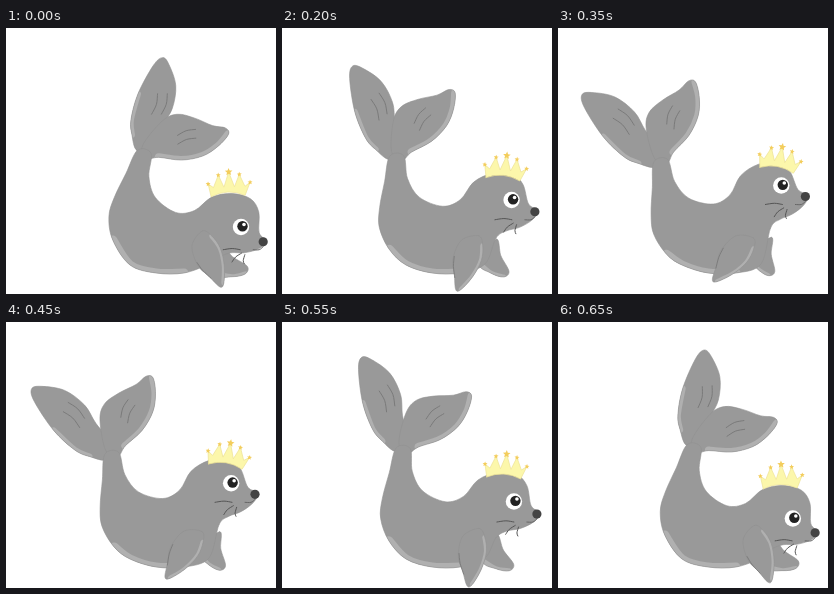
These frames come from a looping animation (270 px wide and 266 px high, 0.7 s). An HTML page with a canvas:

```html
<!DOCTYPE html>
<html lang="en">
<head>
<meta charset="utf-8">
<title>Seal</title>
<style>
html, body { margin: 0; width: 100%; height: 100%; overflow: hidden; background: #fff; }
canvas { display: block; }
</style>
</head>
<body>
<canvas id="stage" width="270" height="266"></canvas>
<script>
const ctx = document.getElementById('stage').getContext('2d');
const LOOP = 700, STEP = 50, RAD = Math.PI / 180;
const GREY = '#999', LIGHT = '#b0b0b0', EDGE = '#919191', LINE = '#777', DARK = '#444';
const PIVOT = [142, 215];

const parse = text => text.split(' ').map(p => p.split(',').map(Number));

// Half-way pose: chest, head, back, tail joint and side rock together, the belly rests
const trunk = parse('214,213 225,206 238,203 251,196 257,187 248,180 243,160 232,149 213,148 194,156 180,173 162,179 139,169 128,150 125,127 111,127 105,152 99,178 98,198 107,220');
const belly = parse('124,237 150,245 178,245 203,236');

// Limbs in units of their length: x from joint to tip, y across
const leftFluke = parse('0,-.08 .15,-.16 .3,-.2 .58,-.18 .9,-.08 1,0 .94,.08 .74,.19 .5,.2 .3,.13 .05,.07');
const rightFluke = parse('0,.08 .15,.1 .4,.19 .65,.2 .85,.13 1,.02 .98,-.06 .84,-.12 .66,-.25 .47,-.34 .28,-.3 0,-.08');
const nearFlipper = parse('0,-.12 .15,-.23 .4,-.27 .7,-.2 .97,-.06 1,.03 .75,.12 .5,.21 .15,.15');
const farFlipper = parse('-.02,-.36 .45,-.18 .96,-.1 1,.13 .69,.36 .25,.47');

// Rises to 1 at the peak time and falls back by the end of the loop
function swing(t, peak) {
  const p = t < peak ? (t / peak) ** .8 : (LOOP - t) / (LOOP - peak);
  return (1 - Math.cos(Math.PI * p)) / 2;
}

const mix = (a, b, k) => a + (b - a) * k;

function rotate([x, y], angle, [ox, oy]) {
  const c = Math.cos(angle), s = Math.sin(angle);
  return [ox + x * c - y * s, oy + x * s + y * c];
}

function smooth(pts, closed) {
  const n = pts.length, path = new Path2D();
  const at = i => closed ? pts[(i + n) % n] : pts[Math.max(0, Math.min(n - 1, i))];
  path.moveTo(...pts[0]);
  for (let i = 0; i < n - (closed ? 0 : 1); i++) {
    const [a, b, c, d] = [at(i - 1), at(i), at(i + 1), at(i + 2)];
    path.bezierCurveTo(b[0] + (c[0] - a[0]) / 6, b[1] + (c[1] - a[1]) / 6,
      c[0] - (d[0] - b[0]) / 6, c[1] - (d[1] - b[1]) / 6, ...c);
  }
  return path;
}

function stroke(path, color, width) {
  ctx.strokeStyle = color;
  ctx.lineWidth = width;
  ctx.stroke(path);
}

// Grey part with a light band along some of its edge
function part(pts, from, to, band) {
  const path = smooth(pts, true);
  ctx.fillStyle = GREY;
  ctx.fill(path);
  ctx.save();
  ctx.clip(path);
  stroke(smooth(pts.slice(from, to)), LIGHT, band);
  ctx.restore();
  stroke(path, EDGE, .6);
}

// Draws a limb and returns its points-to-stage mapping
function limb(outline, joint, degrees, length, from, to, band) {
  const place = ([u, v]) => rotate([u * length, v * length], degrees * RAD, joint);
  part(outline.map(place), from, to, band);
  return place;
}

function creases(place, side) {
  for (const [u, v] of [[.42, .1], [.4, 0]]) {
    const line = [[u, v], [u + .11, v + .03], [u + .22, v + .02]];
    stroke(smooth(line.map(([a, b]) => place([a, b * side]))), LINE, .9);
  }
}

function dot(x, y, r, color) {
  ctx.fillStyle = color;
  ctx.beginPath();
  ctx.arc(x, y, r, 0, 7);
  ctx.fill();
}

function star(x, y, r) {
  ctx.beginPath();
  for (let i = 0; i < 10; i++) {
    const a = i * Math.PI / 5, q = i % 2 ? r * .45 : r;
    ctx.lineTo(x + q * Math.sin(a), y - q * Math.cos(a));
  }
  ctx.fillStyle = '#f3cd5c';
  ctx.fill();
}

function drawCrown(x, y, tilt) {
  const tips = [-2, -1, 0, 1, 2].map(i => [1.5 + 10.5 * i, 2.8 * i * i - 21]);
  ctx.save();
  ctx.translate(x, y);
  ctx.rotate(tilt);
  ctx.beginPath();
  ctx.moveTo(-17, 3);
  for (const [tx, ty] of tips) {
    ctx.lineTo(tx, ty);
    if (tx < 20) ctx.lineTo(tx + 5.2, -6);
  }
  ctx.lineTo(17, 3);
  ctx.quadraticCurveTo(0, -5, -17, 3);
  ctx.fillStyle = '#fcf7ab';
  ctx.fill();
  ctx.strokeStyle = '#eee397';
  ctx.lineWidth = .7;
  ctx.stroke();
  for (const [tx, ty] of tips) star(tx, ty, ty < -20 ? 4 : 2.6);
  ctx.restore();
}

function drawFace([nx, ny], lift) {
  const bow = 10 * lift * (1 - lift);
  const ex = mix(235, 223, lift) + bow, ey = mix(199, 157, lift);
  dot(ex, ey, 8.2, '#fff');
  dot(ex + 1.5, ey - .7, 5.2, '#222');
  dot(ex + 3, ey - 2.5, 1.8, '#fff');
  dot(nx, ny, 4.6, DARK);
  stroke(smooth([[nx, ny + 5], [nx - 4, ny + 8], [nx - 10, ny + 8]]), '#666', 1);
  for (let i = 0; i < 3; i++) {
    const hair = [5, 13 - i, 22 - 4 * i].map((r, j) =>
      rotate([r, j === 1 ? 1.2 : 0], (180 - 43 * i) * RAD, [nx - 18, ny + 8]));
    stroke(smooth(hair), '#555', 1);
  }
  drawCrown(mix(222, 219, lift) + bow / 2, mix(165, 139, lift), mix(-.04, .18, lift));
}

function draw(t) {
  const lift = swing(t, 385), sweep = swing(t, 420);
  const rock = ([x, y]) => rotate([x - PIVOT[0], y - PIVOT[1]], .41 * (.55 - lift), PIVOT);
  ctx.fillStyle = '#fff';
  ctx.fillRect(0, 0, 270, 266);
  ctx.lineCap = ctx.lineJoin = 'round';

  const hinge = rock([118, 127]);
  creases(limb(leftFluke, hinge, -79 - 64 * sweep, 96 + 7 * sweep, 1, 4, 6), 1);
  creases(limb(rightFluke, hinge, -13 - 55 * lift, 86, 1, 6, 8), -1);
  limb(farFlipper, [mix(210, 202, lift), mix(228, 214, lift)], 24 + 46 * lift, 34, 3, 6, 5);
  part([...trunk.map(rock), ...belly], trunk.length - 1, trunk.length + 3, 9);

  const place = limb(nearFlipper, [190, 206], 64 + 63 * lift, 58, 1, 5, 5);
  stroke(smooth([[.45, .2], [.62, .17], [.8, .1]].map(place)), LINE, .8);
  drawFace(rock([254, 188]), lift);
}

function tick() {
  draw(Math.floor(performance.now() % LOOP / STEP) * STEP);
  requestAnimationFrame(tick);
}
tick();
</script>
</body>
</html>
```
